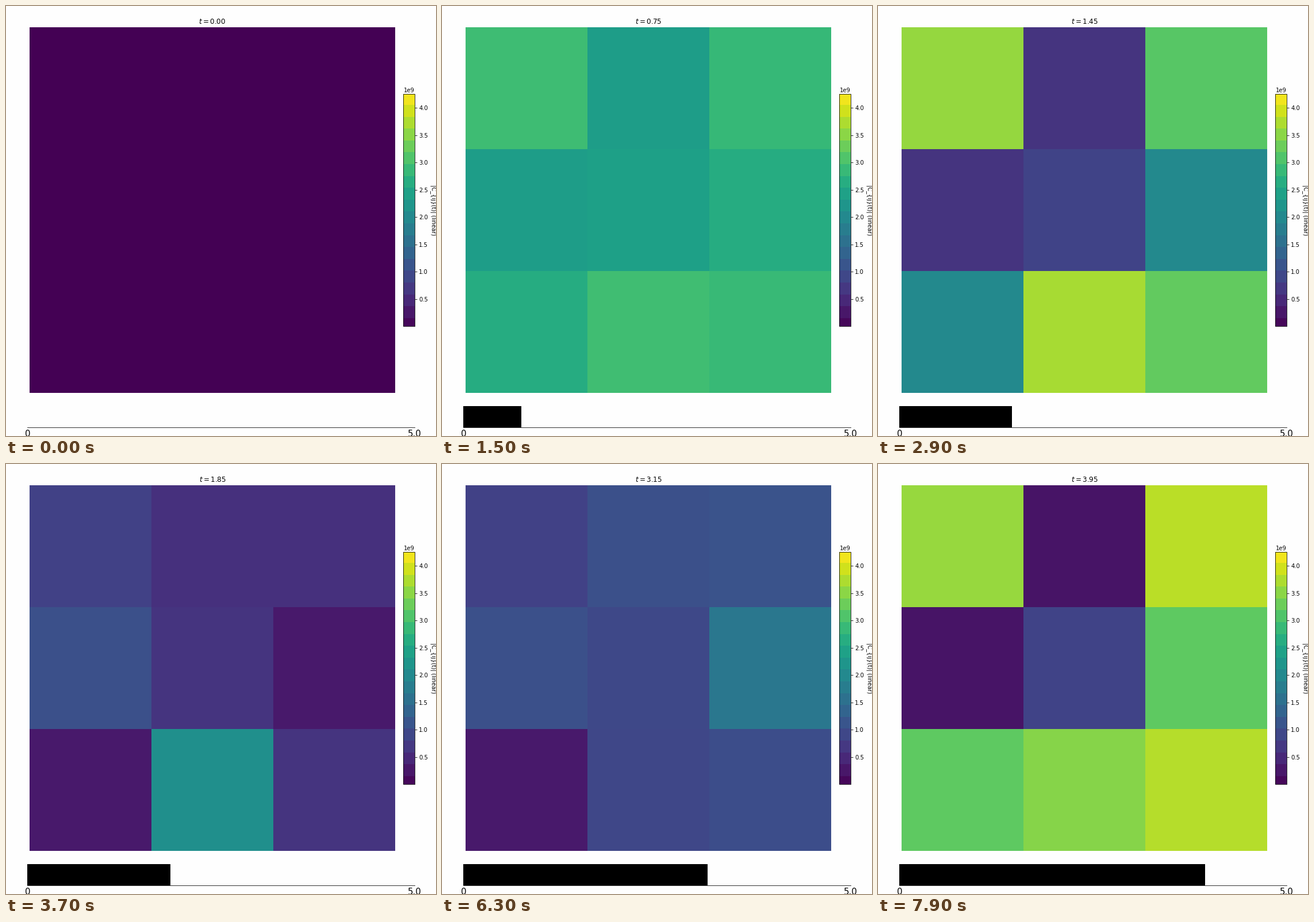
Write a matplotlib script that moves like this. It is 748 by 748 pixels and loops after 8 s.

```python
import numpy as np
import matplotlib.pyplot as plt
from matplotlib.animation import FuncAnimation

SIZE, DPI = 748, 72
FRAMES, STEP_MS, DT = 80, 100, 0.05
VMAX, T_MAX = 4.25e9, 5.0

# Persistence of each cell: how much of the first wave is left at t = 1.45.
PERSIST = np.array([[.84, .15, .74], [.15, .20, .47], [.47, .87, .76]])

# Resting interval (start, end) of each column.
REST = [(1.85, 3.20), (2.25, 3.20), (1.85, 2.72)]


def key_poses(p, start, end):
    """Level at each key time for a cell of persistence p."""
    quiet = 0.03 + 0.55 * abs(p - 0.54)
    return {
        0.00: 0.0,
        0.75: 0.53 + 0.19 * p,
        1.00: 0.50 + 0.53 * p,
        1.45: p,
        start: quiet,
        end: quiet,
        3.55: 0.75 - 4.0 * (p - 0.50) ** 2,
        3.95: 0.90 - 2.8 * (p - 0.70) ** 2,
    }


def level(p, rest, t):
    """Cubic Hermite curve with parabolic tangents, flat while at rest."""
    poses = key_poses(p, *rest)
    k, v = np.array(list(poses)), np.array(list(poses.values()))
    h, m = np.diff(k), np.diff(v) / np.diff(k)
    d = np.empty_like(v)
    d[0], d[-1] = m[0], m[-1]
    d[1:-1] = (h[1:] * m[:-1] + h[:-1] * m[1:]) / (h[1:] + h[:-1])
    d[np.isin(k, rest)] = 0
    i = np.clip(np.searchsorted(k, t, side="right") - 1, 0, len(h) - 1)
    s = (t - k[i]) / h[i]
    y = (v[i] * (1 + 2 * s) * (1 - s) ** 2 + v[i + 1] * s * s * (3 - 2 * s)
         + h[i] * s * (1 - s) * (d[i] * (1 - s) - d[i + 1] * s))
    return np.clip(y, 0, 1)


def grid(t):
    return VMAX * np.array([[level(p, rest, t) for p, rest in zip(row, REST)]
                            for row in PERSIST])


plt.rcParams["font.family"] = "DejaVu Sans"
fig = plt.figure(figsize=(SIZE / DPI, SIZE / DPI), dpi=DPI, facecolor="#fefefe")

# Matrix
ax = fig.add_axes([0.055, 0.1, 0.85, 0.85])
ax.axis("off")
image = ax.imshow(grid(0), cmap="viridis", vmin=0, vmax=VMAX,
                  interpolation="nearest")
title = ax.set_title("$t=0.00$", fontsize=12)

# Banded colour scale
cax = fig.add_axes([0.9237, 0.255, 0.027, 0.54])
bands = np.r_[0, 0.036 + 0.051 * np.arange(19), 1] * VMAX
scale = fig.colorbar(image, cax=cax, boundaries=bands, spacing="proportional",
                     ticks=np.arange(1, 9) * 0.5e9)
scale.set_label("|C_{ij}(t)| (linear)", rotation=270, labelpad=15)

# Time bar
time_ax = fig.add_axes([0.05, 0.02, 0.9, 0.05], facecolor="none")
time_ax.set(xlim=(0, T_MAX), ylim=(0, 1), yticks=[])
time_ax.set_xticks([0, T_MAX], ["0", f"{T_MAX:.1f}"])
time_ax.tick_params(length=0, labelsize=15)
time_ax.spines[["top", "left", "right"]].set_visible(False)
bar = time_ax.barh(0.5, 0, height=1, color="black")[0]


def draw(i):
    t = i * DT
    image.set_data(grid(t))
    title.set_text(f"$t={t:.2f}$")
    bar.set_width(t)
    return image, title, bar


anim = FuncAnimation(fig, draw, frames=FRAMES, interval=STEP_MS, repeat=True)
plt.show()
```
